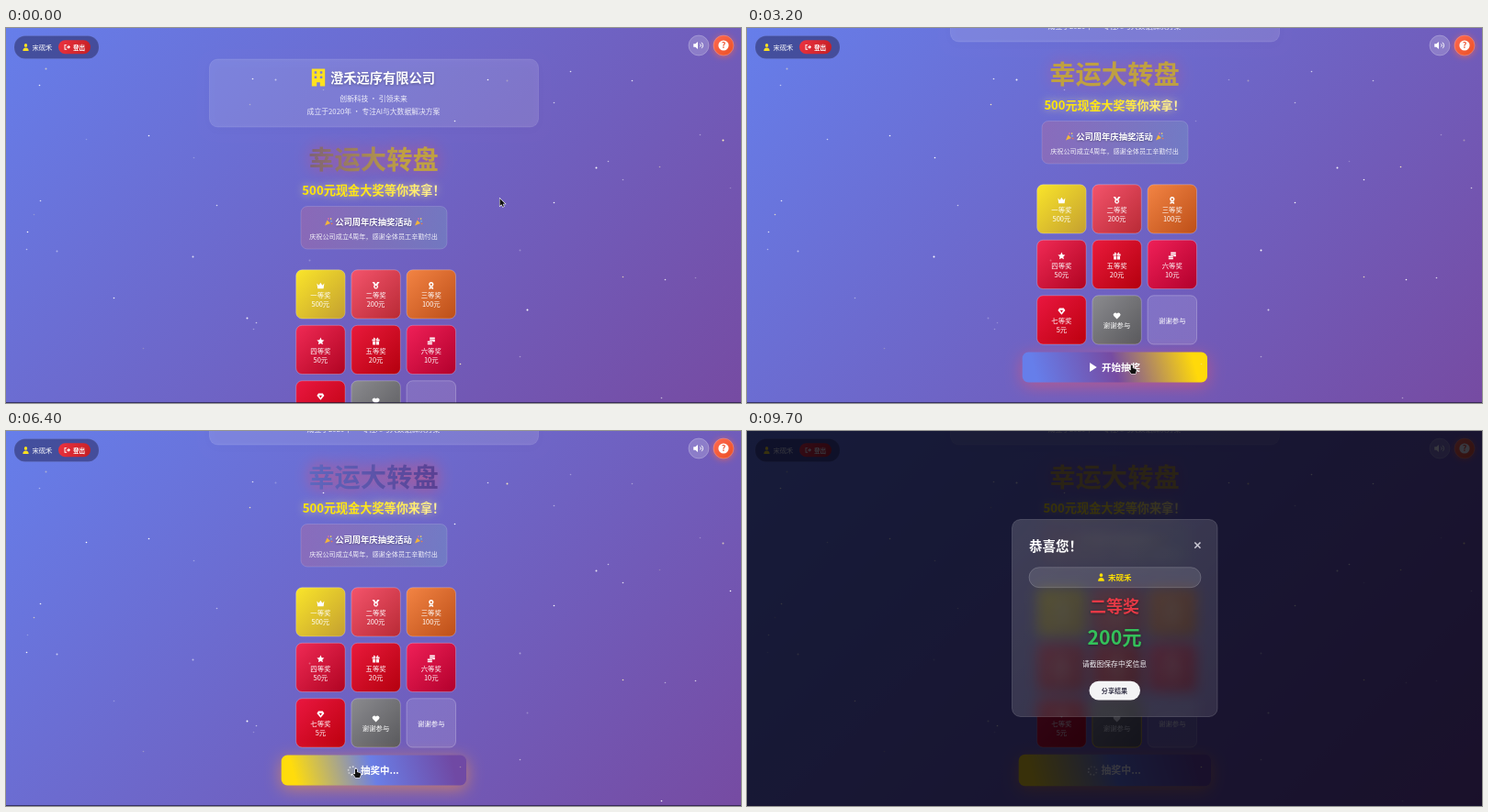
Recreate the animation shown at these times as an HTML page with a canvas. Size 800 by 409 pixels, loop 10 s.

```html
<!DOCTYPE html>
<html lang="zh-CN">
<head>
<meta charset="utf-8">
<title>幸运大转盘</title>
<style>
html, body { margin: 0; width: 100%; height: 100%; overflow: hidden; background: #6b62c8; }
canvas { display: block; }
</style>
</head>
<body>
<canvas id="stage" width="800" height="409"></canvas>
<script>
const canvas = document.getElementById('stage');
const ctx = canvas.getContext('2d');
const W = 800, H = 409, LOOP = 10, SCROLL = 93;
const FONT = '"Noto Sans CJK SC", "Noto Sans CJK", "Noto Sans", sans-serif';
const USER = '宋砚禾', COMPANY = '澄禾远序有限公司';
const CLICK = 4.9, RESULT = 6.85;

const ICONS = {
  crown: 'M0 2L2.6 4.6 5 1 7.4 4.6 10 2 9 9H1Z',
  medal: 'M0 0H3L5 3 7 0H10L7.2 4A3.1 3.1 0 1 1 2.8 4ZM5 5A1.4 1.4 0 1 0 5.01 5Z',
  award: 'M5 0A3.3 3.3 0 1 1 4.99 0ZM5 2A1.4 1.4 0 1 0 5.01 2ZM2.5 6.8L2 10 5 8.8 8 10 7.5 6.8Z',
  star: 'M5 0L6.5 3.3 10 3.7 7.4 6.2 8.1 9.8 5 8 1.9 9.8 2.6 6.2 0 3.7 3.5 3.3Z',
  gift: 'M0 2.5H4.5V5H0ZM5.5 2.5H10V5H5.5ZM.7 5.7H4.5V10H.7ZM5.5 5.7H9.3V10H5.5ZM5 2.5L2.5 0 1.5 2ZM5 2.5L7.5 0 8.5 2Z',
  coins: 'M3 0H10V2.4H3ZM3 3H10V6H7V4.4H3ZM0 5H6.3V7H0ZM0 7.6H6.3V9.8H0Z',
  gem: 'M2 .5H8L10 3.6 5 9.6 0 3.6ZM3 3.4H7L5 7Z',
  heart: 'M5 9.5L.7 5.2A2.6 2.6 0 0 1 5 2 2.6 2.6 0 0 1 9.3 5.2Z',
  user: 'M5 0A2.4 2.4 0 1 1 4.99 0ZM.5 10A4.5 4.5 0 0 1 9.5 10Z',
  exit: 'M0 .5H4V2H1.5V8H4V9.5H0ZM4 4H6.5V1.5L10 5 6.5 8.5V6H4Z',
  sound: 'M0 3.2H2.2L5 .8V9.2L2.2 6.8H0Z',
  building: 'M1 0H9V10H6V7.8H4V10H1ZM2.6 1.5V2.8H4V1.5ZM6 1.5V2.8H7.4V1.5ZM2.6 4.2V5.5H4V4.2ZM6 4.2V5.5H7.4V4.2Z',
  play: 'M1 0L10 5 1 10Z'
};
for (const name in ICONS) ICONS[name] = new Path2D(ICONS[name]);

const PRIZES = [
  ['crown', '一等奖', '500元', '#fae52a', '#c4a030'],
  ['medal', '二等奖', '200元', '#f4546c', '#b92a35'],
  ['award', '三等奖', '100元', '#f38444', '#bd4f18'],
  ['star', '四等奖', '50元', '#f02a55', '#b00422'],
  ['gift', '五等奖', '20元', '#ea1a3c', '#b4000e'],
  ['coins', '六等奖', '10元', '#f02058', '#b2002c'],
  ['gem', '七等奖', '5元', '#ea1740', '#bc000e'],
  ['heart', '谢谢参与', '', '#8b8b8f', '#59595c'],
  ['', '谢谢参与', '', 'rgba(255,255,255,.12)', 'rgba(255,255,255,.12)']
];

const STARS = [
  [43, 44], [36, 62], [87, 121], [268, 55], [293, 56], [265, 83], [155, 117], [204, 141],
  [203, 249], [37, 188], [30, 203], [23, 222], [55, 243], [22, 241], [117, 294], [149, 349],
  [262, 316], [272, 321], [269, 328], [524, 56], [545, 57], [596, 81], [681, 57], [788, 174],
  [642, 152], [711, 151], [671, 165], [596, 190], [559, 242], [717, 274], [671, 271],
  [750, 272], [567, 307], [559, 358], [713, 403], [494, 366], [330, 253], [488, 101],
  [655, 145], [755, 116], [780, 122], [345, 67], [229, 193], [614, 47]
];

const clamp = v => Math.max(0, Math.min(1, v));
const smooth = (t, a, b) => { const k = clamp((t - a) / (b - a)); return k * k * (3 - 2 * k); };
const easeOut = (t, a, b) => 1 - (1 - clamp((t - a) / (b - a))) ** 3;

// Eased value through rows of [time, ...values].
function track(rows, t) {
  let i = 0;
  while (i < rows.length - 2 && t >= rows[i + 1][0]) i++;
  const [a, b] = [rows[i], rows[i + 1]];
  const k = smooth(t, a[0], b[0]);
  return a.slice(1).map((v, n) => v + (b[n + 1] - v) * k);
}

function gradient(x0, y0, x1, y1, colors) {
  const g = ctx.createLinearGradient(x0, y0, x1, y1);
  colors.forEach((c, i) => g.addColorStop(i / (colors.length - 1), c));
  return g;
}

function box(x, y, w, h, r, fill, border) {
  ctx.beginPath();
  ctx.roundRect(x, y, w, h, r);
  ctx.fillStyle = fill;
  ctx.fill();
  if (border) {
    ctx.shadowColor = 'transparent';
    ctx.strokeStyle = border;
    ctx.lineWidth = .7;
    ctx.stroke();
  }
}

function glow(color, blur, dy, draw) {
  ctx.save();
  ctx.shadowColor = color;
  ctx.shadowBlur = blur;
  ctx.shadowOffsetY = dy;
  draw();
  ctx.restore();
}

function text(str, x, y, size, weight = 400, fill = '#fff', align = 'center') {
  ctx.font = `${weight} ${size}px ${FONT}`;
  ctx.textAlign = align;
  ctx.textBaseline = 'middle';
  ctx.fillStyle = fill;
  ctx.fillText(str, x, y);
}

function icon(name, x, y, size, color = '#fff', sizeY = size) {
  ctx.save();
  ctx.translate(x - size / 2, y - sizeY / 2);
  ctx.scale(size / 10, sizeY / 10);
  ctx.fillStyle = color;
  ctx.fill(ICONS[name], 'evenodd');
  ctx.restore();
}

function disc(x, y, r, fill) {
  ctx.beginPath();
  ctx.arc(x, y, r, 0, Math.PI * 2);
  ctx.fillStyle = fill;
  ctx.fill();
}

function zoom(x, y, s, draw) {
  ctx.save();
  ctx.translate(x, y);
  ctx.scale(s, s);
  ctx.translate(-x, -y);
  draw();
  ctx.restore();
}

function background() {
  ctx.fillStyle = gradient(98, -98, 702, 507, ['#667eea', '#764ba2']);
  ctx.fillRect(0, 0, W, H);
}

function stars(t) {
  STARS.forEach(([x, y], i) => {
    const a = .62 + .38 * Math.sin(t * Math.PI * (.6 + i % 3 * .4) + i * 2.4);
    disc(x + .5, y + .5, i % 4 ? .8 : 1, i % 5 ? `rgba(255,255,255,${a})` : `rgba(255,240,190,${a})`);
  });
}

function popper(x, y) {
  ctx.beginPath();
  ctx.moveTo(x - 4, y + 4);
  ctx.lineTo(x - 1.5, y - 2);
  ctx.lineTo(x + 2, y + 1.5);
  ctx.closePath();
  ctx.fillStyle = '#f3b53a';
  ctx.fill();
  [['#ff6fa0', 0, -3.5], ['#66cdf5', 3, -.8], ['#ffe05a', 2.6, -3.4], ['#f5803c', 3.6, 2]]
    .forEach(([c, dx, dy]) => disc(x + dx, y + dy, .8, c));
}

function header() {
  glow('rgba(30,20,80,.18)', 12, 3, () =>
    box(221.5, 34, 358, 74, 9, 'rgba(255,255,255,.13)', 'rgba(255,255,255,.16)'));
  icon('building', 340, 54, 18, '#ffe11f', 19);
  glow('rgba(0,0,0,.3)', 3, 1, () => text(COMPANY, 353, 55, 14.25, 700, '#fff', 'left'));
  text('创新科技 • 引领未来', 400, 77, 7.8, 400, 'rgba(255,255,255,.9)');
  text('成立于2020年 • 专注AI与大数据解决方案', 400, 91, 7.8, 400, 'rgba(255,255,255,.85)');
}

function headline(t) {
  const [p] = track([[0, .65], [.9, .03], [2.4, 0], [3.3, 1], [4.2, .24], [4.7, 0],
    [5.4, .8], [6.4, .02], [7.1, 1], [10, 1]], t);
  const x = 320 - p * 320;
  const fill = gradient(x, 0, x + 480, 0, ['#5f6cc4', '#593f92', '#bfa042', '#bfa042']);
  glow(`rgba(245,70,90,${.75 - p * .35})`, 18, 0, () => text('幸运大转盘', 400, 143, 28.3, 900, fill));
  const pulse = 1 + .008 * Math.cos(t * Math.PI);
  zoom(400, 177, pulse, () => glow('rgba(255,235,130,.65)', 9, 0, () =>
    text('500元现金大奖等你来拿！', 400, 177, 13.1, 700,
      gradient(323, 0, 474, 0, ['#ffe600', '#ffe61c', '#fff0a8']))));
}

function notice() {
  box(321, 194.5, 159, 46.5, 7, gradient(321, 194, 480, 241,
    ['rgba(255,107,107,.2)', 'rgba(120,205,196,.22)']), 'rgba(255,255,255,.2)');
  popper(351, 211.5);
  popper(449, 211.5);
  glow('rgba(0,0,0,.3)', 2, 1, () => text('公司周年庆抽奖活动', 400, 211.5, 9.3, 700));
  text('庆祝公司成立4周年，感谢全体员工辛勤付出', 400, 227, 7.15, 400, 'rgba(255,255,255,.9)');
}

function prizes(t) {
  PRIZES.forEach(([name, label, amount, from, to], i) => {
    const x = 315.7 + i % 3 * 60.2, y = 263.8 + Math.floor(i / 3) * 60.5, cx = x + 26.7;
    const picked = i === 7 && t >= RESULT;
    box(x, y, 53.4, 53.2, 6.5, gradient(x, y, x + 53, y + 53, [from, to]),
      picked ? '#ffd700' : 'rgba(255,255,255,.35)');
    if (amount) {
      icon(name, cx, y + 17.2, 8);
      text(label, cx, y + 27.4, 7.4, 500);
      text(amount, cx, y + 37.7, 7.4, 500);
    } else {
      if (name) icon(name, cx, y + 22, 8);
      text(label, cx, y + (name ? 32 : 27), 7.4, 500);
    }
  });
}

function spinner(x, y, t) {
  for (let i = 0; i < 8; i++) {
    const a = i * Math.PI / 4 + t * Math.PI * 2;
    disc(x + Math.cos(a) * 4.4, y + Math.sin(a) * 4.4, .95, `rgba(255,255,255,${.45 + i * .075})`);
  }
}

function drawButton(t) {
  const busy = t >= CLICK;
  const s = t > 6.4 ? 1 + .05 * Math.sin((t - 6.4) * Math.PI / 2) ** 2 : 1;
  const colors = busy ? ['#ffdc0c', '#6a7ee6', '#7049a4'] : ['#667eea', '#764ba2', '#ffd90a'];
  zoom(400, 463, s, () => {
    glow(busy ? 'rgba(255,150,60,.6)' : 'rgba(255,85,95,.5)', 18, 4, () =>
      box(299.7, 446.5, 201.3, 33, 6.5, gradient(318, 485, 482, 441, colors)));
    if (busy) {
      spinner(377, 463.5, t);
      text('抽奖中...', 386, 463, 10.5, 700, '#fff', 'left');
    } else {
      icon('play', 376.5, 463, 8.5, '#fff', 10);
      text('开始抽奖', 386, 463, 10.5, 700, '#fff', 'left');
    }
  });
}

function fixedBar() {
  box(9, 8.5, 92, 25, 12, 'rgba(15,12,45,.4)', 'rgba(255,255,255,.08)');
  icon('user', 21.5, 21, 7, '#ffe11f', 8);
  text(USER, 28.5, 21.2, 7.3, 500, '#fff', 'left');
  box(57, 13.3, 35, 15, 7.5, gradient(57, 13, 92, 28, ['#ec3340', '#c41f24']));
  icon('exit', 66.8, 20.8, 6.5);
  text('登出', 73, 21, 6.6, 700, '#fff', 'left');

  box(743, 8, 22, 22, 11, 'rgba(255,255,255,.2)', 'rgba(255,255,255,.35)');
  icon('sound', 753, 19, 9.5);
  ctx.strokeStyle = '#fff';
  ctx.lineWidth = 1;
  for (const r of [2, 4.2]) {
    ctx.beginPath();
    ctx.arc(754.3, 19, r, -.9, .9);
    ctx.stroke();
  }
  glow('rgba(255,100,70,.7)', 7, 1, () =>
    box(770, 8, 22, 22, 11, gradient(770, 8, 792, 30, ['#ff6a52', '#ea5024']), 'rgba(255,255,255,.3)'));
  disc(781, 19, 5.6, '#fff');
  text('?', 781, 19, 9, 900, '#ee5636');
}

function scrollbar(t, scroll) {
  const a = smooth(t, .4, .55) * (1 - smooth(t, 1.4, 1.7));
  if (a) box(796.5, 2 + scroll * .85, 3.5, 328, 1.7, `rgba(50,30,80,${.75 * a})`);
}

function modal(t) {
  const k = easeOut(t, RESULT, 7.2);
  ctx.fillStyle = `rgba(1,0,10,${.78 * smooth(t, RESULT - .05, 7)})`;
  ctx.fillRect(0, 0, W, H);
  ctx.save();
  ctx.globalAlpha = k;
  zoom(400, 204, .8 + .2 * k, () => {
    ctx.save();
    ctx.beginPath();
    ctx.roundRect(288.5, 96.5, 223.5, 215, 9);
    ctx.clip();
    ctx.filter = 'blur(7px)';
    ctx.drawImage(canvas, 0, 0);
    ctx.restore();
    box(288.5, 96.5, 223.5, 215, 9, gradient(288, 96, 512, 311,
      ['rgba(255,255,255,.17)', 'rgba(255,255,255,.11)']), 'rgba(255,255,255,.22)');
    text('恭喜您！', 307, 125.5, 14.5, 700, '#fff', 'left');
    ctx.strokeStyle = '#c9c7d2';
    ctx.lineWidth = 1.6;
    ctx.beginPath();
    ctx.moveTo(487.3, 121.5);
    ctx.lineTo(493.5, 127.7);
    ctx.moveTo(493.5, 121.5);
    ctx.lineTo(487.3, 127.7);
    ctx.stroke();
    box(307, 148.7, 187, 22, 11, 'rgba(255,255,255,.12)', 'rgba(255,255,255,.25)');
    icon('user', 385.5, 159.5, 7.5, '#ffdf00', 8.5);
    text(USER, 393, 160, 8.5, 700, '#ffdf00', 'left');
    glow('rgba(0,0,0,.35)', 3, 1, () => {
      text('二等奖', 400, 191.5, 18, 700, '#e63946');
      text('200元', 400, 225, 21.3, 900, '#34c05a');
    });
    text('请截图保存中奖信息', 400, 254, 7.8, 400, '#f2f1f5');
    box(372.5, 272.7, 55.5, 20.8, 10.4, '#f3f3f5');
    text('分享结果', 400, 283.2, 7.1, 700, '#353348');
  });
  ctx.restore();
}

const ARROW = new Path2D('M0 0V8L1.9 6.3 3.2 9 4.5 8.4 3.3 5.8H5.8Z');
const HAND = new Path2D('M-1 0Q0-1 1 0V3L4.5 4Q5.3 4.4 5 6L4 9H-.5L-3 5.5Q-2.7 4.3-1 5.4Z');

function cursor(t) {
  if (t > 8.8) return;
  const [x, y] = track([[0, 537.5, 186], [1.25, 537.5, 186], [2.2, 419, 368], [5.5, 418, 368],
    [6.3, 381, 369], [6.9, 381, 369], [7.6, 412, 269.5], [10, 412, 269.5]], t);
  const hand = t > 2.05 && t < RESULT;
  ctx.save();
  ctx.translate(x, y);
  ctx.lineWidth = 1.1;
  ctx.strokeStyle = '#fff';
  ctx.fillStyle = '#111';
  const shape = hand ? HAND : ARROW;
  ctx.stroke(shape);
  ctx.fill(shape);
  ctx.restore();
}

function frame(now) {
  const t = now / 1000 % LOOP;
  const scroll = SCROLL * easeOut(t, .4, .9);
  background();
  ctx.save();
  ctx.translate(0, -scroll);
  header();
  headline(t);
  notice();
  prizes(t);
  drawButton(t);
  ctx.restore();
  stars(t);
  fixedBar();
  scrollbar(t, scroll);
  if (t >= RESULT - .05) modal(t);
  ctx.fillStyle = 'rgba(25,20,50,.65)';
  ctx.fillRect(0, 408, W, 1);
  cursor(t);
}

const start = performance.now();
function loop() {
  frame(performance.now() - start);
  requestAnimationFrame(loop);
}
loop();
</script>
</body>
</html>
```
